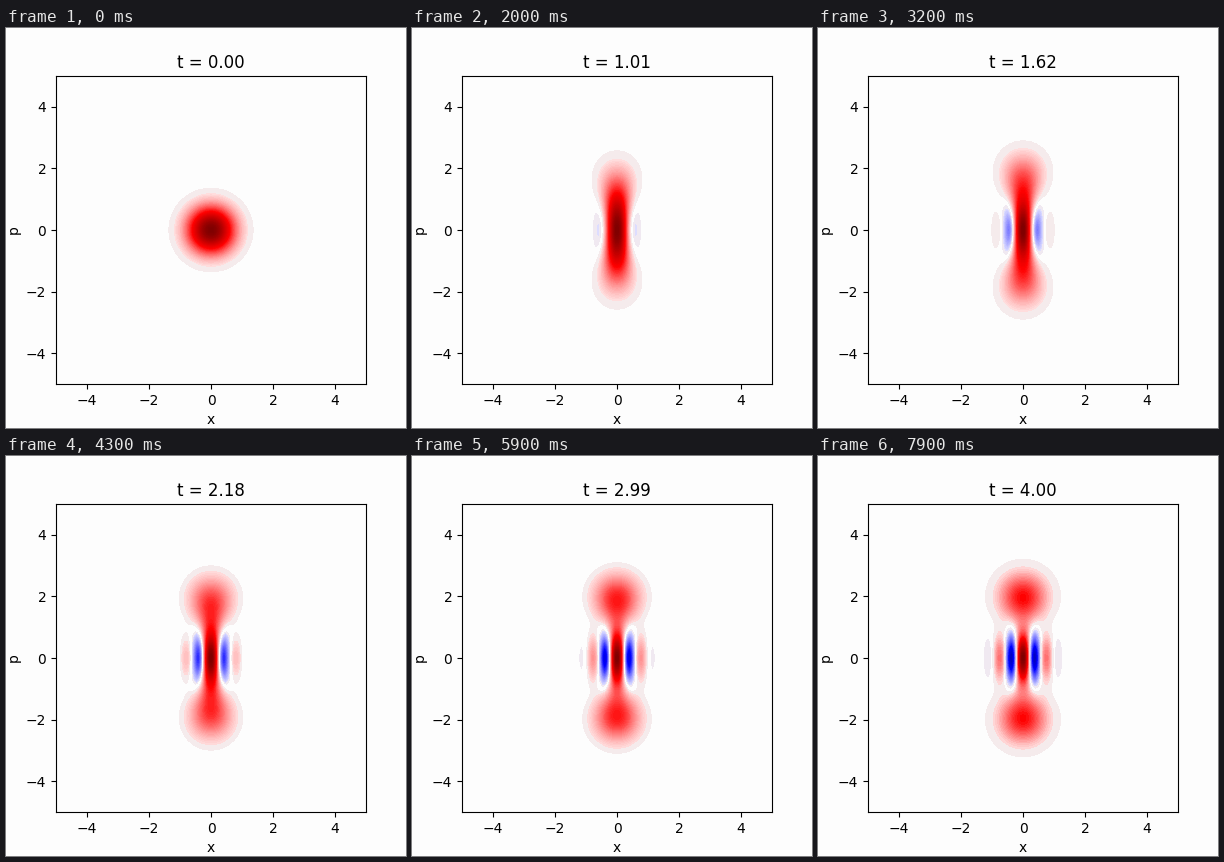
A matplotlib script that plays this animation: 400 px wide and 400 px high, repeating every 8000 ms.

```python
import math

import numpy as np
import matplotlib as mpl
import matplotlib.pyplot as plt
from matplotlib.animation import FuncAnimation
from matplotlib.colors import ListedColormap, Normalize

FRAMES, INTERVAL = 80, 100
T_END, SUBSTEPS = 4.0, 20
LEVELS = 32          # Fock states kept; only the even ones are populated
KAPPA, BETA = 0.25, -4.0
PAPER = "#fdfdfd"

times = np.linspace(0, T_END, FRAMES)


def evolve():
    """Vacuum relaxing to a cat state under the jump operator a^2 - beta."""
    n = np.arange(2, LEVELS, 2)
    jump = math.sqrt(KAPPA) * (np.diag(np.sqrt(n * (n - 1.0)), 1)
                               - BETA * np.eye(LEVELS // 2))
    decay = jump.T @ jump / 2

    def rate(rho):
        return jump @ rho @ jump.T - decay @ rho - rho @ decay

    dt = times[1] / SUBSTEPS
    rho = np.zeros_like(jump)
    rho[0, 0] = 1
    states = [rho]
    for _ in times[1:]:
        for _ in range(SUBSTEPS):
            k1 = rate(rho)
            k2 = rate(rho + dt / 2 * k1)
            k3 = rate(rho + dt / 2 * k2)
            k4 = rate(rho + dt * k3)
            rho = rho + dt / 6 * (k1 + 2 * k2 + 2 * k3 + k4)
        states.append(rho)
    return states


def wigner_basis(x, p):
    """Wigner functions of |m><m+k| for even m and k, with their state indices."""
    alpha = x[None, :] + 1j * p[:, None]
    r2 = 4 * np.abs(alpha) ** 2
    gauss = 2 / math.pi * np.exp(-r2 / 2)
    rows, cols, maps = [], [], []
    for k in range(0, LEVELS, 2):
        shape = gauss * ((2 * alpha) ** k).real * (2 if k else 1)
        previous, laguerre = np.zeros_like(r2), np.ones_like(r2)
        for m in range(LEVELS - k):
            if m % 2 == 0:
                scale = math.sqrt(math.factorial(m) / math.factorial(m + k))
                rows.append(m // 2)
                cols.append((m + k) // 2)
                maps.append(scale * shape * laguerre)
            previous, laguerre = laguerre, (
                (2 * m + 1 + k - r2) * laguerre - (m + k) * previous) / (m + 1)
    return rows, cols, np.array(maps)


def soft_seismic():
    """Seismic with flat near-white steps around zero."""
    colors = mpl.colormaps["seismic"](np.arange(256))
    colors[124:132] = mpl.colors.to_rgba(PAPER)
    colors[132:136] = mpl.colors.to_rgba("#f5ebec")
    colors[120:124] = mpl.colors.to_rgba("#f0e9f1")
    return ListedColormap(colors)


grid = np.linspace(-5, 5, 200)
x = grid[np.abs(grid) < 1.8]
p = grid[np.abs(grid) < 3.8]
states = evolve()
rows, cols, basis = wigner_basis(x, p)
cmap = soft_seismic()

fig, ax = plt.subplots(figsize=(4, 4), dpi=100, facecolor=PAPER)
ax.set_facecolor(PAPER)
ax.set(xlim=(-5, 5), ylim=(-5, 5), xlabel="x", ylabel="p")
title = ax.set_title("")
drawn = []


def update(i):
    while drawn:
        drawn.pop().remove()
    w = np.tensordot(states[i][rows, cols], basis, 1)
    limit = np.abs(w).max()
    drawn.append(ax.contourf(x, p, w, 100, cmap=cmap,
                             norm=Normalize(-limit, limit)))
    ax.set(xlim=(-5, 5), ylim=(-5, 5))
    title.set_text(f"t = {times[i]:.2f}")


anim = FuncAnimation(fig, update, frames=FRAMES, init_func=lambda: None,
                     interval=INTERVAL, repeat=True, repeat_delay=0)
plt.show()
```
